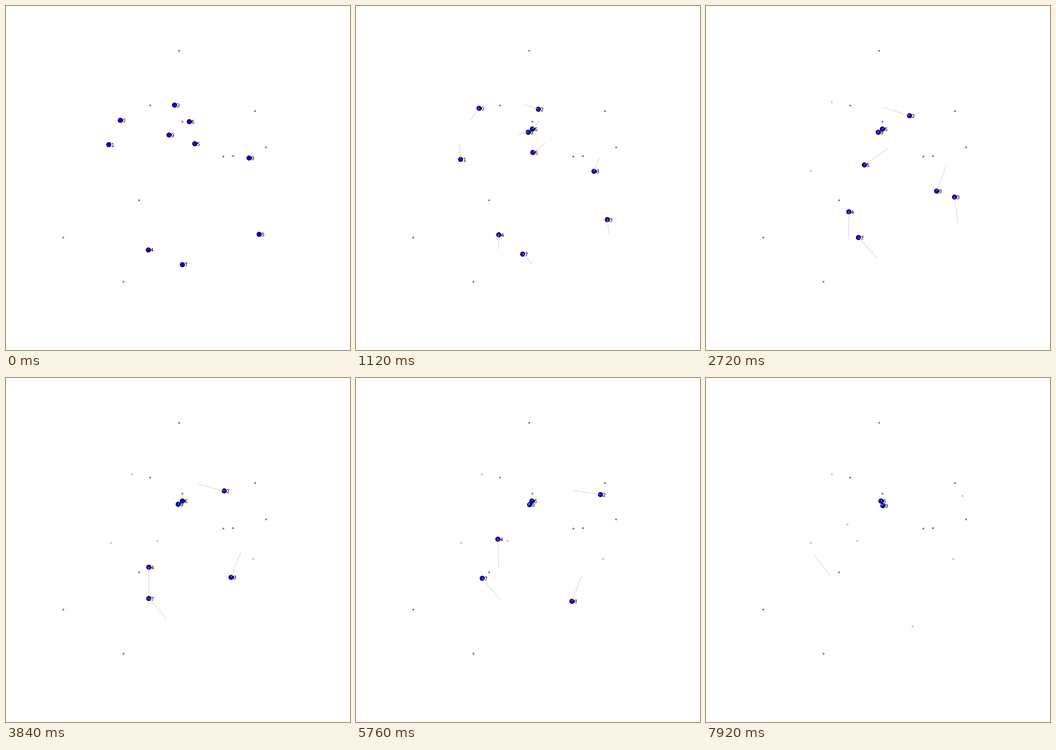
Animation, 748 px wide and 748 px high, one loop 8 s. Source, as a matplotlib script:

```python
import numpy as np
import matplotlib.pyplot as plt
from matplotlib.animation import FuncAnimation

SIZE, DPI = 748, 100
FRAMES, INTERVAL = 100, 80
TRAIL = 25
PX = 72 / DPI

fig = plt.figure(figsize=(SIZE / DPI, SIZE / DPI), dpi=DPI, facecolor="white")
ax = fig.add_axes([0, 0, 1, 1])
ax.set_xlim(0, SIZE)
ax.set_ylim(SIZE, 0)
ax.axis("off")

rng = np.random.default_rng(4)
steps = np.arange(FRAMES)


def walk(start, goal, arrival, bow, drift):
    """Steady, slightly bowed walk to the goal, then a slow eased drift."""
    u = np.clip((steps - 1) / (arrival - 1), 0, 1)
    rest = np.clip((steps - arrival) / (FRAMES - 1 - arrival), 0, 1)
    side = 1j * (goal - start) / abs(goal - start)
    path = start + u * (goal - start) + bow * np.sin(np.pi * u) * side
    path += drift * rest ** 3
    wobble = rng.uniform(-0.4, 0.4, (2, FRAMES))
    wobble[:, :2] = 0
    return np.array([path.real, path.imag]) + wobble


class Agent:
    """A numbered dot with a short trail; a cross marks where it leaves."""

    def __init__(self, label, start, goal, arrival, bow=0, drift=0):
        path = walk(start, goal, arrival, bow, drift)
        self.path = np.round(path) + 0.5
        self.end = FRAMES if drift else arrival
        z = 3 + label
        self.dot, = ax.plot([], [], "o", ms=9.8 * PX, mfc="#0000f0",
                            mec="black", mew=1.2 * PX, snap=False, zorder=z)
        self.trail, = ax.plot([], [], color="#c8c8c8", lw=0.9 * PX,
                              snap=False, zorder=z + 0.2)
        self.text = ax.text(0, 0, str(label), family="DejaVu Sans",
                            size=11.5 * PX, antialiased=False,
                            ha="center", va="baseline", zorder=z + 0.4)
        self.cross, = ax.plot([goal.real + 0.5], [goal.imag + 0.5], "x",
                              ms=5 * PX, mec="#9a9aff", mew=PX,
                              snap=False, zorder=2)

    def update(self, n):
        alive = n < self.end
        for artist in (self.dot, self.trail, self.text):
            artist.set_visible(alive)
        self.cross.set_visible(not alive)
        if alive:
            x, y = self.path[:, n]
            self.dot.set_data([x], [y])
            self.trail.set_data(*self.path[:, max(0, n - TRAIL):n + 1])
            self.text.set_position((x + 8.5, y + 5))
        return self.dot, self.trail, self.text, self.cross


landmarks = np.array([376 + 96j, 313 + 215j, 541 + 227j, 383 + 250j, 565 + 306j,
                      472 + 326j, 493 + 325j, 289 + 421j, 124 + 502j, 255 + 598j])
ax.plot(landmarks.real + 0.5, landmarks.imag + 0.5, "D", ms=3.6 * PX,
        mfc="#787878", mec="none", snap=False, zorder=1)

agents = [
    Agent(0, 248 + 247j, 273 + 208j, 20, bow=2),
    Agent(1, 223 + 300j, 228 + 357j, 24, bow=-1.5),
    Agent(2, 366 + 214j, 557 + 255j, 83, bow=7),
    Agent(3, 550 + 495j, 537 + 392j, 43),
    Agent(4, 309 + 529j, 307 + 317j, 85, bow=2),
    Agent(5, 410 + 298j, 329 + 353j, 41, bow=-2),
    Agent(6, 398 + 250j, 383 + 266j, 10, drift=-3),
    Agent(7, 383 + 561j, 234 + 384j, 99, bow=-2.5, drift=0),
    Agent(8, 528 + 329j, 449 + 539j, 97),
    Agent(9, 354 + 279j, 374 + 273j, 10, drift=10 + 3j),
]
agents[7].end = FRAMES  # still walking when the loop closes


def draw(n):
    return [artist for agent in agents for artist in agent.update(n)]


anim = FuncAnimation(fig, draw, frames=FRAMES, interval=INTERVAL,
                     init_func=lambda: draw(0), repeat=True, repeat_delay=0)
plt.show()
```
